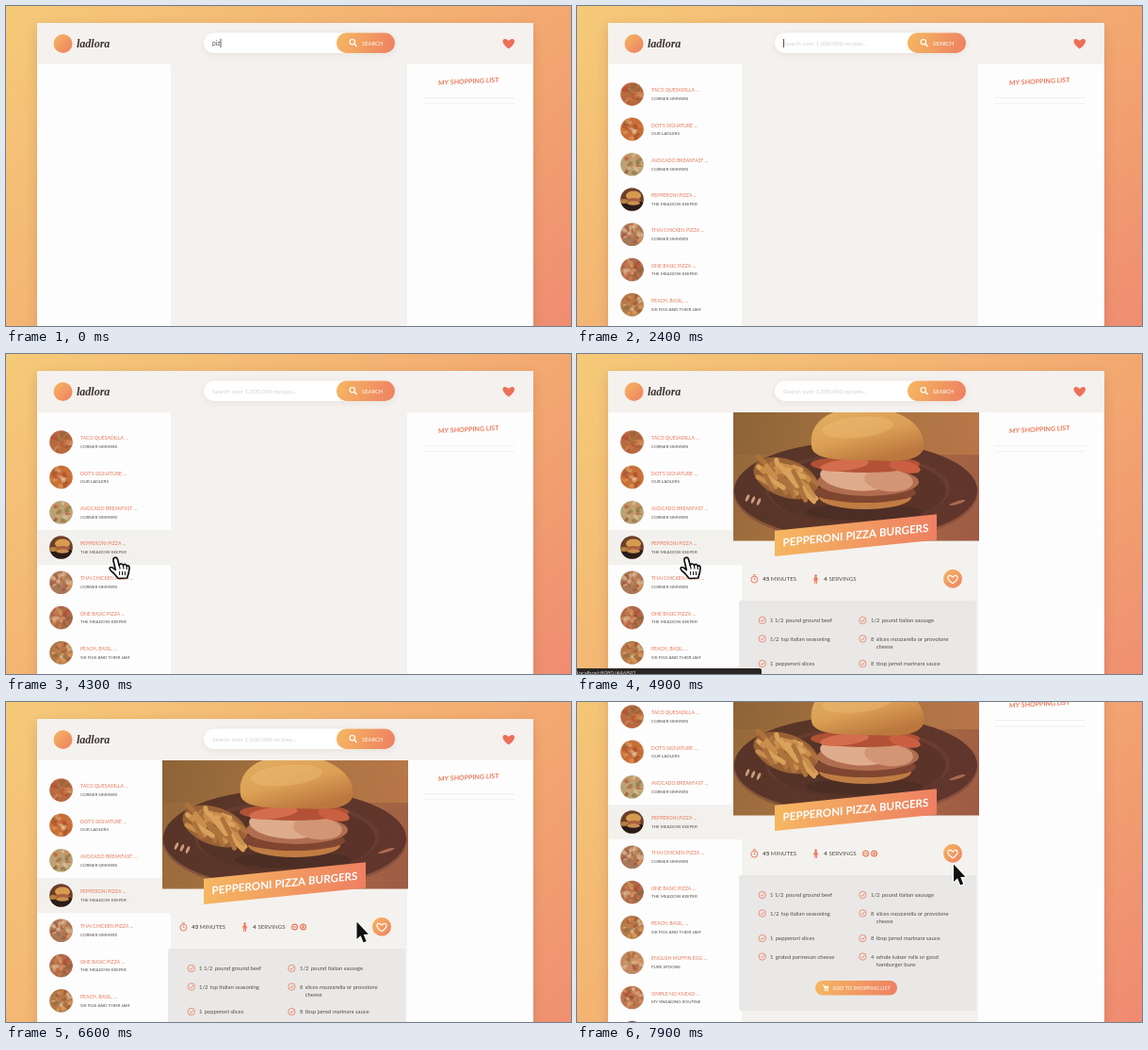
An HTML page with a canvas that plays this animation: 600 by 340 pixels, repeating every 8 s.

```html
<!DOCTYPE html>
<html lang="en">
<head>
<meta charset="utf-8">
<title>Recipe search</title>
<style>
  html, body { margin: 0; width: 100%; height: 100%; overflow: hidden; background: #f3a870; }
  canvas { display: block; width: 600px; height: 340px; }
</style>
</head>
<body>
<canvas id="stage" width="600" height="340"></canvas>
<script>
const ctx = document.getElementById('stage').getContext('2d');
const LOOP = 8000, W = 600, H = 340;
const SANS = 'Lato, "Open Sans", sans-serif';
const CORAL = '#ec7a5c', DARK = '#574d49', CREAM = '#f4f2ee';

const RESULTS = [
  ['TACO QUESADILLA ...', 'CORNER SIMMERS', '#b8693f'],
  ["DOT'S SIGNATURE ...", 'OUR LADLERS', '#c86f36'],
  ['AVOCADO BREAKFAST ...', 'CORNER SIMMERS', '#b9a274'],
  ['PEPPERONI PIZZA ...', 'THE MEADOW KEEPER', '#6b3f28'],
  ['THAI CHICKEN PIZZA ...', 'CORNER SIMMERS', '#a87858'],
  ['ONE BASIC PIZZA ...', 'THE MEADOW KEEPER', '#ad6a4b'],
  ['PEACH, BASIL, ...', 'SIX FIGS AND THEIR JAM', '#b17a48'],
  ['ENGLISH MUFFIN EGG ...', 'PURE SPOONS', '#c08a62'],
  ['SIMPLE NO KNEAD ...', 'MY KNEADING ROUTINE', '#bd7551'],
  ['GRILLED FLATBREAD ...', 'CORNER SIMMERS', '#6d4a3c']
];
const INGREDIENTS = [
  [0, 283, '1 1/2', 'pound ground beef'],
  [1, 283, '1/2', 'pound italian sausage'],
  [0, 302.5, '1/2', 'tsp italian seasoning'],
  [1, 302.5, '8', 'slices mozzarella or provolone', 'cheese'],
  [0, 329, '1', 'pepperoni slices'],
  [1, 329, '8', 'tbsp jarred marinara sauce'],
  [0, 348.5, '1', 'grated parmesan cheese'],
  [1, 348.5, '4', 'whole kaiser rolls or good', 'hamburger buns']
];

const clamp = v => Math.max(0, Math.min(1, v));
const span = (t, a, b) => clamp((t - a) / (b - a));
const smooth = p => p * p * (3 - 2 * p);
const easeOut = p => 1 - (1 - p) ** 3;
const mix = (a, b, p) => a + (b - a) * p;

function rng(seed) {
  return () => (seed = (seed * 16807) % 2147483647) / 2147483647;
}

function text(s, x, y, size, color, weight = 400, family = SANS) {
  ctx.font = `${weight} ${size}px ${family}`;
  ctx.fillStyle = color;
  ctx.fillText(s, x, y);
}

function rect(x, y, w, h, color) {
  ctx.fillStyle = color;
  ctx.fillRect(x, y, w, h);
}

function pill(x, y, w, h, fill, r = h / 2) {
  ctx.beginPath();
  ctx.roundRect(x, y, w, h, r);
  ctx.fillStyle = fill;
  ctx.fill();
}

function oval(x, y, rx, ry, fill, turn = 0) {
  ctx.beginPath();
  ctx.ellipse(x, y, rx, ry, turn, 0, Math.PI * 2);
  ctx.fillStyle = fill;
  ctx.fill();
}

function ring(x, y, r, color, width = 0.8) {
  ctx.beginPath();
  ctx.arc(x, y, r, 0, Math.PI * 2);
  stroke(color, width);
}

function stroke(color, width) {
  ctx.strokeStyle = color;
  ctx.lineWidth = width;
  ctx.stroke();
}

function line(points, color, width) {
  ctx.beginPath();
  points.forEach(([x, y]) => ctx.lineTo(x, y));
  stroke(color, width);
}

function blend(x0, y0, x1, y1, ...colors) {
  const g = ctx.createLinearGradient(x0, y0, x1, y1);
  colors.forEach((c, i) => g.addColorStop(i / (colors.length - 1), c));
  return g;
}

const warm = (x, y, w, h) => blend(x, y, x + w, y + h, '#f5b861', '#ee7f62');

function shadow(blur, dy, color, draw) {
  ctx.save();
  ctx.shadowBlur = blur;
  ctx.shadowOffsetY = dy;
  ctx.shadowColor = color;
  draw();
  ctx.restore();
}

function heartPath(x, y, s) {
  ctx.beginPath();
  ctx.moveTo(x, y + 0.85 * s);
  ctx.bezierCurveTo(x - 1.7 * s, y - 0.25 * s, x - 0.95 * s, y - 1.4 * s, x, y - 0.5 * s);
  ctx.bezierCurveTo(x + 0.95 * s, y - 1.4 * s, x + 1.7 * s, y - 0.25 * s, x, y + 0.85 * s);
  ctx.closePath();
}

function skewed(x, y, deg, draw) {
  ctx.save();
  ctx.transform(1, Math.tan(deg * Math.PI / 180), 0, 1, x, y);
  draw();
  ctx.restore();
}

// corner-to-corner gradient over the whole document
function backdrop(h) {
  const k = W * h / (W * W + h * h), dx = h * k, dy = W * k;
  rect(0, 0, W, h, blend(W / 2 - dx, h / 2 - dy, W / 2 + dx, h / 2 + dy,
    '#f5ca78', '#f3a870', '#ed7a71'));
}

function header(t) {
  rect(33, 18, 527, 44, '#f4f1ee');
  oval(60.5, 40, 10, 10, warm(50, 30, 20, 20));
  text('ladlora', 75, 43.5, 12, '#3b3230', 'italic 700', '"Liberation Serif", serif');

  shadow(6, 1.5, 'rgba(110,80,60,.1)', () => pill(210, 28.5, 203, 21.5, '#fff'));
  const typed = t < 120 ? 'piz' : t < 300 ? 'pizz' : 'pizza';
  const waiting = t >= 900;
  if (waiting) text('Search over 1,000,000 recipes...', 219, 42, 6.4, '#d6d0cd');
  else text(typed, 219, 42, 6.6, DARK);
  if (t < 4000) {
    const x = waiting ? 219 : 219.3 + ctx.measureText(typed).width;
    rect(x, 35, 0.9, 9, '#4a4240');
  }

  pill(351, 28.5, 62, 21.5, warm(351, 28, 62, 22));
  ring(367.8, 38.2, 2.7, '#fff', 1.2);
  line([[369.8, 40.2], [372.6, 43]], '#fff', 1.5);
  text('SEARCH', 378, 41.8, 5.8, '#fff', 400);

  heartPath(533.8, 40.2, 6.2);
  ctx.fillStyle = '#ed6f58';
  ctx.fill();
}

function thumb(i, y, base) {
  const rand = rng(811 + i * 977);
  const tones = ['#e2a365', '#a9442f', '#ecd2ae', '#8a6438', '#d9834f'];
  ctx.save();
  ctx.beginPath();
  ctx.arc(58.5, y, 12.3, 0, Math.PI * 2);
  ctx.clip();
  rect(46, y - 13, 26, 26, base);
  if (i === 3) {
    oval(58, y + 6, 13, 6, '#2c1c17');
    oval(60, y - 4, 8, 5, '#d79a50');
    oval(60, y + 1, 8, 2.4, '#a9603f');
    oval(60, y + 4, 7, 2.2, '#cb8f52');
    oval(50, y + 2, 4, 2.5, '#b97f40');
  } else {
    for (let k = 0; k < 24; k++) {
      const a = rand() * 6.28, d = Math.sqrt(rand()) * 10.5;
      ctx.globalAlpha = 0.5;
      oval(58.5 + Math.cos(a) * d, y + Math.sin(a) * d, 1.4 + rand() * 2.6, 1 + rand() * 1.6,
        tones[Math.floor(rand() * tones.length)], a);
    }
  }
  ctx.restore();
}

function results(t) {
  const glow = [];
  glow[2] = 0.55 * span(t, 3350, 3550) * (1 - span(t, 3600, 3850));
  glow[3] = span(t, 3600, 3900);
  RESULTS.forEach(([title, author, base], i) => {
    const y = 93.6 + i * 37.3;
    if (glow[i]) {
      ctx.globalAlpha = glow[i];
      rect(33, y - 18.5, 142, 37.2, '#f3f1ee');
      ctx.globalAlpha = 1;
    }
    thumb(i, y, base);
    text(title, 79, y - 2.4, 5.15, CORAL);
    text(author, 79, y + 6.3, 4.5, DARK);
  });
}

function fries() {
  const rand = rng(4242);
  oval(222, 132, 36, 20, '#8f5a30', 0.35);
  ctx.lineCap = 'round';
  for (let i = 0; i < 30; i++) {
    const x = 200 + rand() * 46, y = 108 + (x - 200) * 0.3 + rand() * 28;
    const a = 0.2 + rand() * 1.1, l = 6 + rand() * 8, dx = Math.cos(a) * l, dy = Math.sin(a) * l;
    line([[x - dx, y - dy], [x + dx, y + dy]], ['#c48a48', '#d6a05a', '#a66c38'][i % 3], 5);
  }
  ctx.lineCap = 'butt';
}

function burger() {
  oval(305, 168, 62, 9, '#351f1c');
  oval(306, 152, 49, 13, '#b9793f');
  oval(306, 147, 54, 11, '#6f3a29');
  oval(309, 136, 54, 15, '#a8674d');
  oval(296, 131, 38, 14, '#dcae92', 0.1);
  oval(331, 134, 26, 12, '#cd9679', 0.1);
  oval(306, 117, 58, 9, '#a9472f');
  oval(284, 118, 26, 6, '#d0664a', -0.12);
  oval(348, 120, 17, 6, '#c4573c', 0.2);
  ctx.beginPath();
  ctx.moveTo(249, 98);
  ctx.bezierCurveTo(246, 76, 262, 59, 298, 57);
  ctx.bezierCurveTo(343, 55, 372, 76, 368, 101);
  ctx.bezierCurveTo(362, 116, 334, 114, 308, 113);
  ctx.bezierCurveTo(278, 113, 250, 112, 249, 98);
  ctx.fillStyle = blend(290, 58, 304, 116, '#dfac60', '#d9a053', '#b37339');
  ctx.fill();
  oval(298, 78, 38, 11, 'rgba(246,208,136,.28)', -0.1);
}

function photo() {
  ctx.save();
  ctx.beginPath();
  ctx.rect(166, 62, 261, 136.5);
  ctx.clip();
  rect(166, 62, 261, 137, blend(166, 62, 427, 198, '#8a5f35', '#a06d3d', '#8f5440'));
  rect(166, 62, 261, 45, blend(166, 62, 427, 62, 'rgba(125,88,50,.5)', 'rgba(186,126,70,.7)'));
  oval(296, 147, 130, 53, '#7a4a38');
  oval(296, 145, 129, 52, '#482822');
  oval(298, 143, 98, 38, '#533029');
  oval(298, 145, 94, 36, '#432520');
  [[181, 153], [187, 155], [193, 157]].forEach(([x, y]) => oval(x, y, 1.6, 4, '#c79a80', 0.4));
  oval(404, 158, 9, 1.6, '#9c6650', -0.3);
  fries();
  burger();
  rect(166, 62, 261, 137, blend(166, 62, 427, 198, 'rgba(245,190,100,.08)', 'rgba(238,120,95,.16)'));
  ctx.restore();
}

function details(t) {
  ring(188.4, 239.6, 3.5, CORAL, 1);
  line([[188.4, 237.5], [188.4, 239.8], [190, 239.8]], CORAL, 0.8);
  line([[186.9, 234.8], [189.9, 234.8]], CORAL, 1);
  text('45', 197, 241.3, 6.3, DARK, 700);
  text('MINUTES', 205.8, 241.3, 6.2, DARK);

  oval(253.6, 235.6, 1.3, 1.3, CORAL);
  pill(252.2, 237.1, 2.8, 4, CORAL, 1);
  line([[251.2, 240.5], [252.2, 237.8], [255, 237.8], [256, 240.5]], CORAL, 0.8);
  line([[252.6, 244], [253, 240.5], [254.2, 240.5], [254.6, 244]], CORAL, 1.1);
  text('4', 262, 241.3, 6.3, DARK, 700);
  text('SERVINGS', 267.4, 241.3, 6.2, DARK);

  if (t > 5500) [306.6, 315.6].forEach((x, i) => {
    ring(x, 239, 2.9, CORAL, 1.2);
    line([[x - 1.7, 239], [x + 1.7, 239]], CORAL, 1.1);
    if (i) line([[x, 237.3], [x, 240.7]], CORAL, 1.1);
  });

  oval(399, 238.8, 10, 10, warm(389, 229, 20, 20));
  heartPath(399, 239.5, 5);
  stroke('#fff', 1.2);
}

function ingredients() {
  pill(172, 262, 252, 144, '#e9e8e6', 2);
  INGREDIENTS.forEach(([col, y, count, first, second]) => {
    const x = col ? 303.4 : 196.8;
    ring(x, y, 3.7, CORAL, 0.8);
    line([[x - 1.6, y], [x - 0.3, y + 1.4], [x + 2, y - 1.5]], CORAL, 0.9);
    const left = col ? 312 : 205;
    text(count, left, y + 2, 5.9, DARK);
    const indent = left + ctx.measureText(count).width + 2.3;
    text(first, indent, y + 2, 5.9, DARK);
    if (second) text(second, indent, y + 10, 5.9, DARK);
  });

  pill(253, 374, 87, 15.5, warm(253, 374, 87, 16));
  line([[260.8, 379], [262.2, 379], [263.4, 383.2], [266.5, 383.2]], '#fff', 0.9);
  rect(262.6, 379.8, 4.6, 2.4, '#fff');
  oval(263.8, 384.6, 0.8, 0.8, '#fff');
  oval(266.2, 384.6, 0.8, 0.8, '#fff');
  text('ADD TO SHOPPING LIST', 271.5, 383.7, 5.4, '#fff');
}

function recipe(t) {
  photo();
  skewed(296, 192.6, -5.8, () => {
    rect(-86, -13.7, 172, 27.4, warm(-86, -14, 172, 28));
    ctx.textAlign = 'center';
    text('PEPPERONI PIZZA BURGERS', 0, 4, 11.6, '#fff', 700);
    ctx.textAlign = 'left';
  });
  details(t);
  ingredients();
}

function shopping() {
  skewed(459, 84.2, -3, () => text('MY SHOPPING LIST', 0, 0, 7, CORAL, 700));
  rect(443, 97, 97, 0.8, '#efedeb');
  rect(443, 103.4, 97, 0.8, '#efedeb');
}

function shape(points, fill, edge, width) {
  ctx.beginPath();
  points.forEach(([x, y]) => ctx.lineTo(x, y));
  ctx.closePath();
  ctx.lineJoin = 'round';
  stroke(edge, width);
  ctx.fillStyle = fill;
  ctx.fill();
}

function arrow() {
  shape([[0, 0], [0, 18.5], [4.1, 14.8], [7.1, 22], [10.2, 20.7], [7.2, 13.6], [12.4, 13.2]], '#111', '#fff', 2.4);
}

function hand() {
  ctx.beginPath();
  ctx.moveTo(-2, 2);
  ctx.bezierCurveTo(-2.6, -1.8, 1.7, -2.5, 2.6, 1);
  ctx.lineTo(4.2, 7.2);
  ctx.bezierCurveTo(5.2, 4.8, 8, 5, 8.4, 7.2);
  ctx.bezierCurveTo(9.6, 5.2, 12, 5.8, 12.2, 8);
  ctx.bezierCurveTo(13.4, 6.6, 15, 7.6, 15, 10);
  ctx.lineTo(14.3, 15);
  ctx.lineTo(12.6, 20.5);
  ctx.lineTo(3.2, 21);
  ctx.lineTo(-1.5, 15.5);
  ctx.bezierCurveTo(-4.2, 13.3, -7, 11, -5.6, 9.4);
  ctx.bezierCurveTo(-4, 8, -1.8, 10, 0.3, 12);
  ctx.closePath();
  ctx.lineJoin = 'round';
  ctx.fillStyle = '#fff';
  ctx.fill();
  stroke('#111', 1.7);
  line([[4.2, 7], [5.2, 11]], '#111', 1.1);
  line([[8.4, 7.2], [9, 11]], '#111', 1.1);
  line([[12.2, 8.2], [12.2, 11.5]], '#111', 1.1);
  [4.5, 7.4, 10.3].forEach(x => line([[x, 13.5], [x + 0.2, 17.5]], '#111', 1));
}

function beam() {
  const bars = [[[-4, -10], [-1.5, -10], [0, -8.5], [1.5, -10], [4, -10]],
    [[0, -8.5], [0, 8.5]],
    [[-4, 10], [-1.5, 10], [0, 8.5], [1.5, 10], [4, 10]]];
  bars.forEach(b => line(b, '#fff', 3.2));
  bars.forEach(b => line(b, '#111', 1.8));
}

function pointer(t) {
  if (t < 2950) return;
  let x, y;
  if (t < 5600) {
    const p = span(t, 2950, 3580);
    x = mix(300, 116, p);
    y = mix(54, 217.5, p);
  } else if (t < 7200) {
    const p = smooth(span(t, 5600, 6400));
    x = mix(116, 372.5, p);
    y = mix(217.5, 233.5, p) + 5.5 * span(t, 6700, 6900);
  } else {
    const p = smooth(span(t, 7200, 7850));
    x = mix(372.5, 400, p);
    y = mix(239, 172.5, p);
  }
  ctx.save();
  ctx.translate(x, y);
  if (t < 6300 && x < 175) hand();
  else if (t > 6850 && t < 7450) beam();
  else arrow();
  ctx.restore();
}

function draw(t) {
  const scroll = 58.5 * smooth(span(t, 6700, 7080)) + 19.5 * easeOut(span(t, 7100, 7500));
  const loaded = t >= 4650;
  ctx.save();
  ctx.translate(0, -scroll);
  backdrop(loaded ? 640 : 560);
  shadow(14, 4, 'rgba(110,60,40,.2)', () => pill(33, 18, 527, 640, '#fdfdfd', 2));
  rect(175, 62, 251, 600, CREAM);
  header(t);
  if (t >= 1700) results(t);
  if (loaded) recipe(t);
  shopping();
  ctx.restore();

  if (t >= 4400 && t < 5750) {
    pill(-4, 334, 200, 12, '#2a2624', 2);
    text('localhost:8080/#46892', 0, 340.5, 6, '#d8d4d2');
  }
  pointer(t);
}

const start = performance.now();
function tick(now) {
  draw(Math.max(0, now - start) % LOOP);
  requestAnimationFrame(tick);
}
requestAnimationFrame(tick);
</script>
</body>
</html>
```
